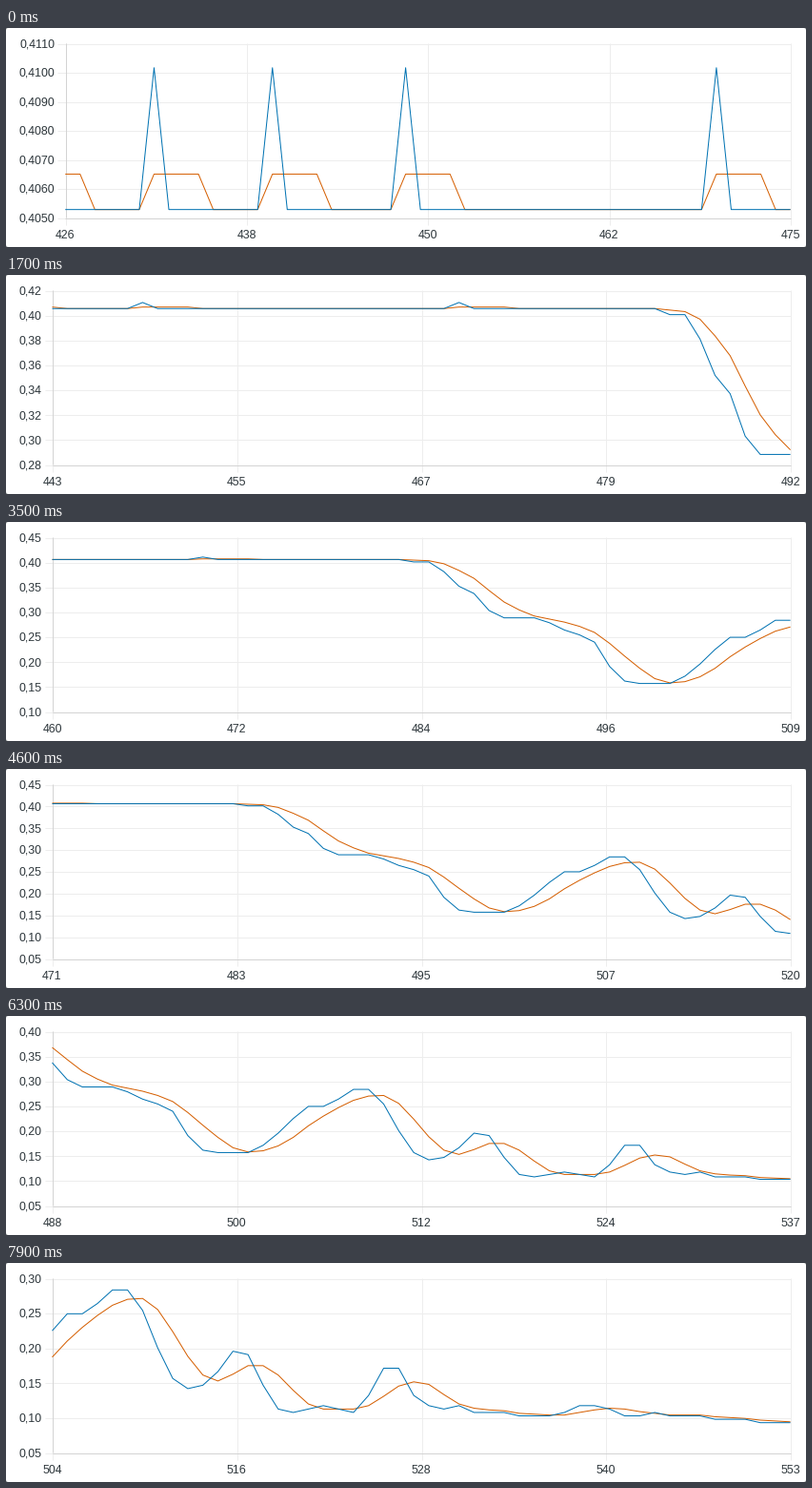
Write a matplotlib script that moves like this. It is 840 px wide and 230 px high and loops after 8 s.

```python
import math

import numpy as np
import matplotlib.pyplot as plt
from matplotlib.animation import FuncAnimation
from matplotlib.collections import LineCollection
from matplotlib.patches import FancyBboxPatch

W, H, DPI = 840, 230, 80
FRAMES, INTERVAL = 80, 100
PX = 72 / DPI
TOP, BOTTOM, RIGHT = 16, 199, 823.6
WINDOW = 50

BLUE, ORANGE = "#0072B2", "#D55E00"
GRID, BORDER, INK = "#EDEDED", "#D3D3D3", "#2C353A"
FONT = dict(family="Liberation Sans", size=12.35 * PX, color=INK, va="baseline")
DIGIT_W, COMMA_W = 6.86, 2.94

# 10-bit sensor counts; the signal idles at 83 until sample 484.
FIRST = 420
TAIL = [
    82, 82, 78, 72, 69, 62, 59, 59, 59, 57, 54, 52, 49, 39, 33, 32, 32, 32,
    35, 40, 46, 51, 51, 54, 58, 58, 52, 41, 32, 29, 30, 34, 40, 39, 30, 23,
    22, 23, 24, 23, 22, 27, 35, 35, 27, 24, 23, 24, 22, 22, 22, 21, 21, 21,
    22, 24, 24, 23, 21, 21, 22, 21, 21, 21, 20, 20, 20, 19, 19, 19,
]
counts = np.array([83] * (484 - FIRST) + TAIL, float)
for spike in (424, 432, 440, 449, 470):
    counts[spike - FIRST] = 84
raw = counts * 5 / 1024
smooth = raw.copy()
smooth[3:] = sum(raw[k:len(raw) - 3 + k] for k in range(4)) / 4


def window_start(i):
    """First visible sample; the feed stalls a few times."""
    return 426 + i - (i in (9, 13) or i >= 30)


def nice(value):
    base = 10.0 ** math.floor(math.log10(value))
    fraction = value / base
    return next(n for n in (1, 2, 5, 10) if fraction <= n + 1e-9) * base


def value_ticks(low, high, spaces=10):
    grace = 0.025 * (high - low)
    low, high = low - grace, high + grace
    step = nice((high - low) / spaces)
    count = math.ceil(high / step) - math.floor(low / step)
    if count > spaces:
        step = nice(count * step / spaces)
    first, last = math.floor(low / step), math.ceil(high / step)
    return [round(n * step, 8) for n in range(first, last + 1)]


def decimals(ticks):
    k = 1 if len(ticks) > 3 else 0
    return max(0, -math.floor(math.log10(ticks[k + 1] - ticks[k])))


def crisp(v):
    return math.floor(v + 1e-6) + 0.5


fig = plt.figure(figsize=(W / DPI, H / DPI), dpi=DPI, facecolor="#8A9090")
ax = fig.add_axes([0, 0, 1, 1])
ax.set(xlim=(0, W), ylim=(H, 0))
ax.axis("off")
ax.add_patch(FancyBboxPatch((0, 0), W, H, boxstyle="round,pad=0,rounding_size=2.5",
                            fc="white", ec="none", zorder=0))

grid = ax.add_collection(LineCollection([], colors=GRID, linewidths=PX, zorder=1))
border = ax.add_collection(LineCollection([], colors=BORDER, linewidths=PX, zorder=2))
style = dict(lw=PX, solid_joinstyle="round", solid_capstyle="butt", snap=False)
smooth_line, = ax.plot([], [], color=ORANGE, zorder=3, **style)
raw_line, = ax.plot([], [], color=BLUE, zorder=4, **style)
ax.set(xlim=(0, W), ylim=(H, 0))
y_labels = [ax.text(0, 0, "", ha="right", **FONT) for _ in range(13)]
x_labels = [ax.text(0, 221, "", ha="center", **FONT) for _ in range(5)]


def draw(i):
    start = window_start(i)
    part = slice(start - FIRST, start - FIRST + WINDOW)
    a, b = raw[part], smooth[part]
    ticks = value_ticks(min(a.min(), b.min()), max(a.max(), b.max()))
    digits = decimals(ticks)
    left = 25 + DIGIT_W * (digits + 1) + COMMA_W

    def to_y(v):
        return BOTTOM - (v - ticks[0]) / (ticks[-1] - ticks[0]) * (BOTTOM - TOP)

    xs = np.linspace(left, RIGHT, WINDOW)
    raw_line.set_data(xs, to_y(a))
    smooth_line.set_data(xs, to_y(b))

    segments = []
    for n, label in enumerate(y_labels):
        label.set_visible(n < len(ticks))
        if n < len(ticks):
            y = to_y(ticks[n])
            label.set_position((left - 11, y + 4.3))
            label.set_text(f"{ticks[n]:.{digits}f}".replace(".", ","))
            segments.append([(left - 8, crisp(y)), (RIGHT, crisp(y))])
    for n, label in enumerate(x_labels):
        x = left + (RIGHT - left) * n / 4
        label.set_x(x)
        label.set_text(str(int(start + (WINDOW - 1) * n / 4)))
        segments.append([(crisp(x), TOP), (crisp(x), BOTTOM + 8)])
    grid.set_segments(segments)

    x0, y0 = crisp(left), crisp(BOTTOM)
    border.set_segments([[(x0, TOP), (x0, BOTTOM)], [(left, y0), (RIGHT, y0)]])
    return []


anim = FuncAnimation(fig, draw, frames=FRAMES, interval=INTERVAL, repeat=True,
                     repeat_delay=0, init_func=lambda: draw(0))
plt.show()
```
